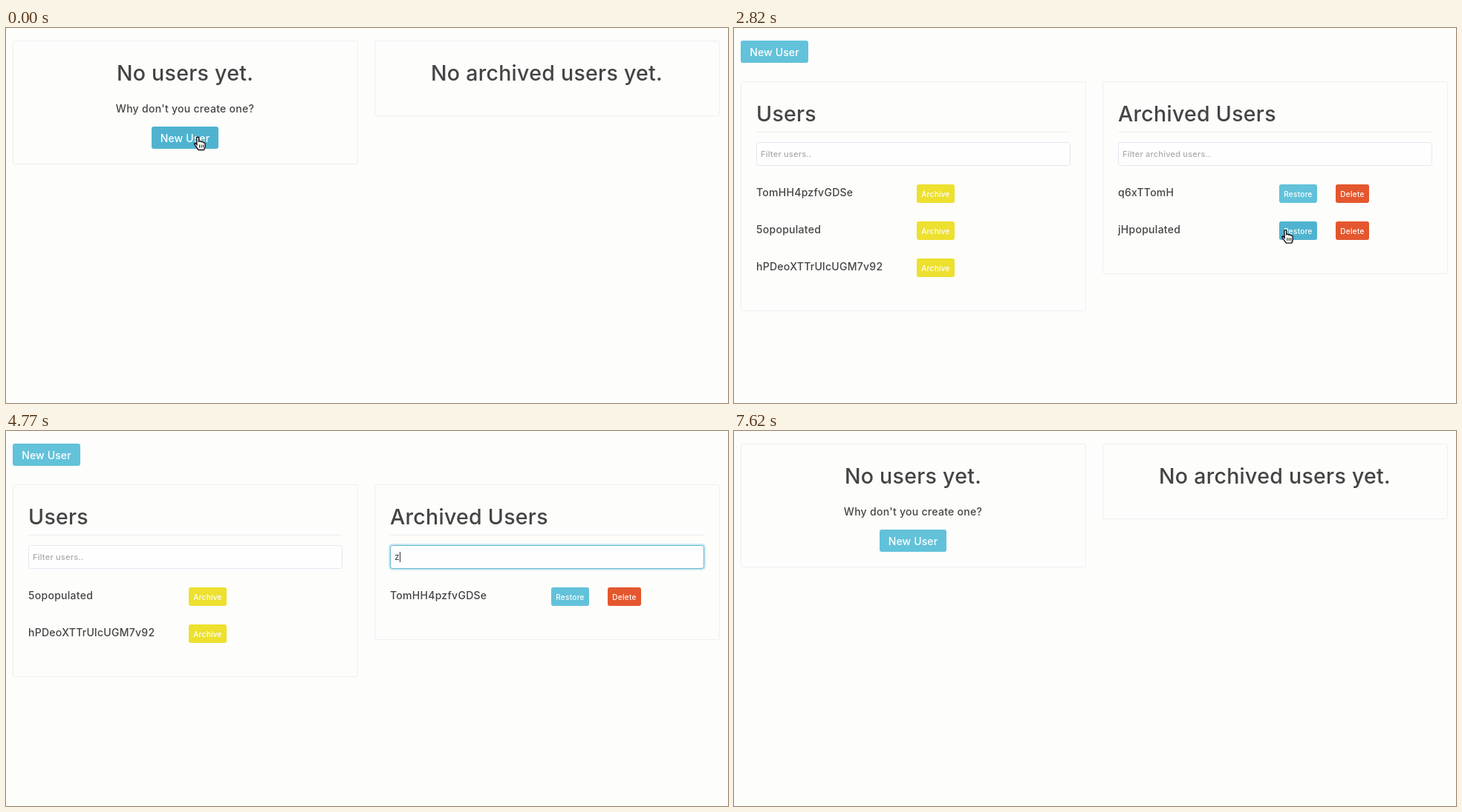
An HTML page that plays this animation: 972 by 506 pixels, repeating every 7.65 s.

```html
<!DOCTYPE html>
<html lang="en">
<head>
<meta charset="utf-8">
<title>User list</title>
<style>
html, body { margin: 0; width: 100%; height: 100%; overflow: hidden; background: #fdfdfb; }
svg { display: block; width: 972px; height: 506px; }
text { font-family: Inter, "Open Sans", sans-serif; fill: #444; white-space: pre; }
.title { font-size: 28.5px; font-weight: 500; letter-spacing: .01em; }
.body { font-size: 14px; font-weight: 500; letter-spacing: .02em; }
.label { font-size: 14px; font-weight: 500; letter-spacing: .01em; fill: #fff; }
.small { font-size: 10px; font-weight: 500; letter-spacing: .03em; fill: #fff; }
.hint { font-size: 11px; font-weight: 500; letter-spacing: .02em; fill: #aaa; }
.typed { font-size: 12px; }
</style>
</head>
<body>
<svg id="stage" viewBox="0 0 972 506"></svg>
<script>
const LOOP = 7650, STEP = 30, LINE = '#eeeef6';
const stage = document.getElementById('stage');

// Newest first; lists hold indices into this array.
const names = ['q6xTTomH', 'jHpopulated', 'TomHH4pzfvGDSe', '5opopulated', 'hPDeoXTTrUlcUGM7v92'];

const events = [
  [90, 'create'], [450, 'create'], [570, 'create'], [690, 'create'], [930, 'create'],
  [1200, 'archive'], [1410, 'archive'],
  [1650, 'left', ''], [1830, 'left', 'u'], [2430, 'left', ''], [2700, 'blur'],
  [3270, 'restore'], [3720, 'restore'],
  [4080, 'archive'], [4230, 'archive'], [4380, 'archive'],
  [4590, 'right', ''], [4740, 'right', 'z'], [5160, 'right', ''],
  [5640, 'remove'], [5850, 'remove'], [6120, 'remove'],
  [6480, 'archive'], [6750, 'archive'],
  [7110, 'remove'], [7290, 'remove']
];

const path = [
  [0, 258, 147], [120, 258, 147], [360, 62, 33], [960, 62, 33],
  [1140, 270, 222], [1440, 270, 222], [1590, 250, 168], [1710, 250, 168],
  [1890, 760, 530], [2460, 760, 530], [2940, 739, 225], [3780, 739, 225],
  [4020, 268, 222], [4410, 268, 222], [4560, 600, 168], [5220, 600, 168],
  [5550, 835, 218], [6150, 835, 218], [6390, 268, 222], [6780, 268, 222],
  [7050, 838, 166], [7320, 838, 166], [7530, 990, 320], [LOOP, 990, 320]
];

// Normal and hovered fill of each button type.
const colors = {
  create: ['#62c2da', '#4fb3d0'],
  archive: ['#ede02e', '#e2d420'],
  restore: ['#62c2da', '#4fb3d0'],
  remove: ['#e4572e', '#d9411e']
};

const shapes = {
  arrow: '<path d="M0 0v14l3.5-3 2.3 5.5 2.2-1-2.2-5.2h4.8z" fill="#111" stroke="#fff"/>',
  hand: '<path d="M-1.5 1q1.5-2 3 0v5q3-1 3 .5 3-.5 3.2 1 2.5 0 2.3 2v3q0 2-1.5 5h-7.5l-5-7q-1-2.5 1-2l2 2z" fill="#fff" stroke="#111" stroke-width="1.4"/>' +
    '<path d="M2.5 10.5v4M5 10.5v4M7.5 10.5v4" stroke="#111"/>',
  beam: '<path d="M-3-7q3 0 3 2v10q0 2-3 2M3-7q-3 0-3 2v10q0 2 3 2" fill="none" stroke="#333"/>'
};

let mouse, pointer, state;

function stateAt(t) {
  const s = { users: [], archived: [], focus: '', left: '', right: '' };
  let next = names.length;
  const move = (from, to) => {
    to.push(from.shift());
    to.sort((a, b) => a - b);
  };
  for (const [time, type, value] of events) {
    if (time > t) break;
    s.focus = type === 'blur' ? '' : type;
    if (type === 'create') s.users.unshift(--next);
    if (type === 'archive') move(s.users, s.archived);
    if (type === 'restore') move(s.archived, s.users);
    if (type === 'remove') s.archived.shift();
    if (value !== undefined) s[type] = value;
  }
  return s;
}

function mouseAt(t) {
  const i = path.findIndex(p => p[0] > t);
  const [t0, x0, y0] = path[i - 1], [t1, x1, y1] = path[i];
  const k = (t - t0) / (t1 - t0), e = k * k * (3 - 2 * k);
  return { x: x0 + (x1 - x0) * e, y: y0 + (y1 - y0) * e, shown: t < 4710 || t >= 5220 };
}

const over = (x, y, w, h) => mouse.shown &&
  mouse.x >= x && mouse.x < x + w && mouse.y >= y && mouse.y < y + h;

const text = (str, x, y, cls, anchor = 'start') =>
  `<text x="${x}" y="${y}" class="${cls}" text-anchor="${anchor}">${str}</text>`;

const rect = (x, y, w, h, fill, stroke = 'none', width = 1, r = 3) =>
  `<rect x="${x}" y="${y}" width="${w}" height="${h}" rx="${r}" fill="${fill}" stroke="${stroke}" stroke-width="${width}"/>`;

const box = (x, y, w, h, stroke = LINE, fill = 'none') =>
  rect(x + .5, y + .5, w - 1, h - 1, fill, stroke);

function button(label, type, x, y, w, h, focused) {
  const hover = over(x, y, w, h), big = h === 30;
  if (hover) pointer = 'hand';
  let out = '';
  if (focused) out += rect(x - 1.5, y - 1.5, w + 3, h + 3, 'none', '#8ab6f4', 4, 4);
  out += rect(x, y, w, h, colors[type][+hover]);
  if (focused) out += box(x, y, w, h, '#d5e8fb');
  return out + text(label, x + w / 2, y + (big ? 21 : 17), big ? 'label' : 'small', 'middle');
}

function field(side, hint, x, y) {
  const focused = state.focus === side, value = state[side];
  if (over(x, y, 423, 32)) pointer = 'beam';
  let out = focused ? rect(x, y, 423, 32, 'none', '#cde9f2', 4) : '';
  out += box(x, y, 423, 32, focused ? '#62b8d0' : '#e6e6ee', '#fefefe');
  out += value ? text(value, x + 6, y + 20, 'typed') : text(hint, x + 6, y + 20, 'hint');
  if (focused) out += rect(x + 6 + value.length * 7, y + 9, 1, 14, '#333', 'none', 0, 0);
  return out;
}

function list(side, title, hint, ids, x, y, actions) {
  const shown = ids.filter(i => names[i].toLowerCase().includes(state[side]));
  let out = box(x, y, 465, 160 + 50 * shown.length) +
    text(title, x + 21, y + 54, 'title') +
    rect(x + 21, y + 68, 423, 1, LINE, 'none', 0, 0) +
    field(side, hint, x + 21, y + 82);
  shown.forEach((id, i) => {
    out += text(names[id], x + 21, y + 155 + 50 * i, 'body');
    for (const [label, type, dx, w] of actions)
      out += button(label, type, x + dx, y + 139 + 50 * i, w, 25, !i && state.focus === type);
  });
  return out;
}

function render(t) {
  state = stateAt(t);
  mouse = mouseAt(t);
  pointer = 'arrow';
  const { users, archived, focus } = state, y = users.length ? 72 : 17;
  let out = '';

  if (users.length) {
    out += button('New User', 'create', 9, 17, 91, 30, focus === 'create') +
      list('left', 'Users', 'Filter users..', users, 9, y, [['Archive', 'archive', 237, 51]]);
  } else {
    out += box(9, y, 465, 167) +
      text('No users yet.', 241, y + 54, 'title', 'middle') +
      text("Why don't you create one?", 241, y + 97, 'body', 'middle') +
      button('New User', 'create', 196, y + 116, 90, 30);
  }

  if (archived.length) {
    out += list('right', 'Archived Users', 'Filter archived users..', archived, 496, y,
      [['Restore', 'restore', 238, 51], ['Delete', 'remove', 314, 45]]);
  } else {
    out += box(496, y, 465, 102) +
      text('No archived users yet.', 728, y + 54, 'title', 'middle');
  }

  if (mouse.shown)
    out += `<g transform="translate(${mouse.x} ${mouse.y})">${shapes[pointer]}</g>`;
  stage.innerHTML = out;
}

const start = performance.now();
let last = -1;
function tick() {
  const t = Math.floor((performance.now() - start) % LOOP / STEP) * STEP;
  if (t !== last) render(last = t);
  requestAnimationFrame(tick);
}
tick();
</script>
</body>
</html>
```
